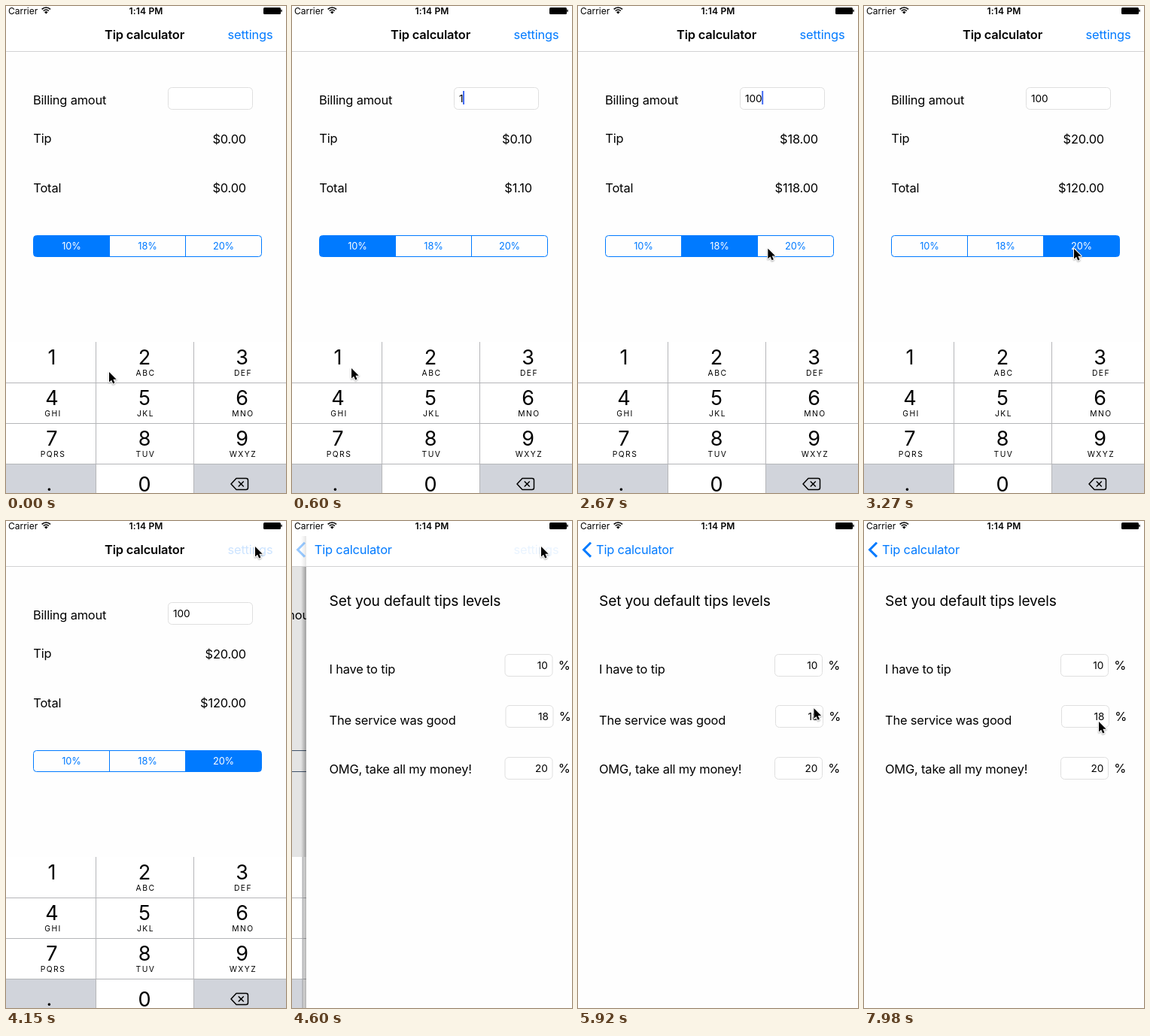
Write an HTML page with a canvas that moves like this. It is 372x648 px and loops after 8 s.

```html
<!DOCTYPE html>
<html lang="en">
<head>
<meta charset="utf-8">
<title>Tip calculator</title>
<style>
html, body { margin: 0; width: 100%; height: 100%; overflow: hidden; background: #fefefe; }
canvas { display: block; width: 372px; height: 648px; }
</style>
</head>
<body>
<canvas id="stage"></canvas>
<script>
const W = 372, H = 648, LOOP = 8000;
const STEP = 147.7;
const BLUE = '#007aff', PAGE = '#fefefe', INK = '#000', KEY_GRAY = '#d1d4db', RULE = '#b5b6b9';
const KEYS_TOP = 447, BODY = 16.4;

const canvas = document.getElementById('stage');
const ctx = canvas.getContext('2d');
const dpr = window.devicePixelRatio || 1;
canvas.width = W * dpr;
canvas.height = H * dpr;

// Pointer moves; from and to are counted in refresh steps
const moves = [
  { from: 0, to: 2, x: 79, y: 482 },    // key 1
  { from: 4, to: 7, x: 183, y: 629 },   // key 0
  { from: 11, to: 13, x: 172, y: 411 },
  { from: 13, to: 15, x: 188, y: 322 }, // 18%
  { from: 17, to: 19, x: 279, y: 323 }, // 20%
  { from: 22, to: 28, x: 331, y: 34 },  // settings
  { from: 34, to: 42, x: 312, y: 267 },
  { from: 46, to: 47, x: 314, y: 260 },
  { from: 47, to: 49, x: 313, y: 267 },
  { from: 50, to: 52, x: 312, y: 243 },
  { from: 52, to: 54, x: 312, y: 267 }
];

function pointerAt(step) {
  let x = 137, y = 487;
  for (const m of moves) {
    const p = Math.min(1, Math.max(0, (step - m.from) / (m.to - m.from)));
    const ease = Math.sin(p * Math.PI / 2);
    x += (m.x - x) * ease;
    y += (m.y - y) * ease;
  }
  return [x, y];
}

function text(str, x, y, { size = BODY, color = INK, align = 'left', weight = 400, space = -0.01 * size } = {}) {
  ctx.font = `${weight} ${size}px Inter, "Open Sans", sans-serif`;
  ctx.letterSpacing = space + 'px';
  ctx.textAlign = align;
  ctx.fillStyle = color;
  ctx.fillText(str, x, y);
}

function rect(x, y, w, h, color) {
  ctx.fillStyle = color;
  ctx.fillRect(x, y, w, h);
}

function roundBox(x, y, w, h, r) {
  ctx.beginPath();
  ctx.roundRect(x, y, w, h, r);
}

function stroke(color, width) {
  ctx.strokeStyle = color;
  ctx.lineWidth = width;
  ctx.stroke();
}

function line(points, color, width) {
  ctx.beginPath();
  points.forEach(([x, y]) => ctx.lineTo(x, y));
  stroke(color, width);
}

function field(x, y, w) {
  roundBox(x + 0.5, y + 0.5, w - 1, 29, 5);
  ctx.fillStyle = '#fff';
  ctx.fill();
  stroke('#dfdfdf', 1);
}

function group(draw, alpha = 1, dx = 0) {
  ctx.save();
  ctx.globalAlpha = alpha;
  ctx.translate(dx, 0);
  draw();
  ctx.restore();
}

function statusBar() {
  text('Carrier', 3, 10.5, { size: 12, space: 0 });
  text('1:14 PM', 186, 10.5, { size: 12, weight: 600, align: 'center', space: 0.2 });
  for (const r of [8, 5]) {
    ctx.beginPath();
    ctx.arc(53.3, 10, r, -Math.PI * 0.75, -Math.PI * 0.25);
    stroke(INK, 1.6);
  }
  ctx.fillStyle = INK;
  ctx.beginPath();
  ctx.moveTo(53.3, 10.5);
  ctx.arc(53.3, 10.5, 3.2, -Math.PI * 0.75, -Math.PI * 0.25);
  ctx.fill();
  roundBox(342, 2, 23, 9, 1.5);
  ctx.fill();
  rect(365.3, 4.8, 1.4, 3, INK);
}

function segments(selected, pressed, tint) {
  const left = 36.5, top = 305.5, w = 101, h = 28;
  ctx.save();
  roundBox(left, top, 3 * w, h, 4);
  ctx.clip();
  rect(left + selected * w, top, w, h, tint);
  if (pressed >= 0) rect(left + pressed * w, top, w, h, 'rgba(0,122,255,.2)');
  ctx.restore();
  roundBox(left, top, 3 * w, h, 4);
  stroke(tint, 1);
  ['10%', '18%', '20%'].forEach((label, i) => {
    const x = left + i * w;
    if (i) line([[x, top], [x, top + h]], tint, 1);
    text(label, x + w / 2, 324.3, {
      size: 12.8, align: 'center', color: i === selected ? '#fff' : tint
    });
  });
}

function keypad(pressed) {
  const centers = [61, 184, 313.5];
  const letters = ['', 'ABC', 'DEF', 'GHI', 'JKL', 'MNO', 'PQRS', 'TUV', 'WXYZ'];
  const digit = (d, x, y) => text(d, x, y, { size: 27, align: 'center', space: 0 });
  rect(0, KEYS_TOP, W, H - KEYS_TOP, '#fff');
  rect(0, 610, 119, 38, KEY_GRAY);
  rect(250, 610, W - 250, 38, KEY_GRAY);
  if (pressed === '1') rect(0, KEYS_TOP, 119, 54, KEY_GRAY);
  if (pressed === '0') rect(120, 610, 129, 38, KEY_GRAY);
  for (const y of [501, 555, 609]) rect(0, y, W, 1, RULE);
  for (const x of [119, 249]) rect(x, KEYS_TOP, 1, H - KEYS_TOP, RULE);
  letters.forEach((abc, i) => {
    const x = centers[i % 3], y = 476.5 + 54 * Math.floor(i / 3);
    digit(i + 1, x, y);
    text(abc, x + 1.5, y + 15.7, { size: 10.3, align: 'center', space: 1.5 });
  });
  digit('0', 184, 646);
  digit('.', 57.5, 644.5);
  deleteIcon();
}

function deleteIcon() {
  ctx.lineJoin = 'round';
  ctx.beginPath();
  ctx.moveTo(299, 636);
  ctx.lineTo(306, 628.5);
  ctx.arcTo(321.5, 628.5, 321.5, 636, 2.5);
  ctx.arcTo(321.5, 643.5, 306, 643.5, 2.5);
  ctx.lineTo(306, 643.5);
  ctx.closePath();
  stroke(INK, 1.5);
  for (const d of [3.5, -3.5]) line([[308.8, 636 - d], [315.8, 636 + d]], INK, 1.5);
}

// Bill text and the step at which it last changed
function typedAt(step) {
  if (step >= 10) return ['100', 10];
  if (step >= 8) return ['10', 8];
  return step >= 4 ? ['1', 4] : ['', 0];
}

function caretAlpha(step, since) {
  if (!since || step >= 27) return 0;
  const phase = (step - since) * STEP / 1000;
  return Math.min(1, Math.max(0, 0.5 + 1.6 * Math.cos(phase * 2 * Math.PI - 0.9)));
}

function calculator(step, tint) {
  const [bill, since] = typedAt(step);
  const choice = step >= 21 ? 2 : step >= 17 ? 1 : 0;
  const pressed = step === 20 ? 2 : step === 16 ? 1 : -1;
  const tip = bill * [0.1, 0.18, 0.2][choice];
  const money = (n, y) => text('$' + n.toFixed(2), 319, y, { align: 'right' });
  text('Billing amout', 36, 131.3);
  text('Tip', 36.3, 181.7);
  text('Total', 36.3, 247.5);
  money(tip, 182.5);
  money(Number(bill) + tip, 247.5);
  field(215, 108, 113);
  text(bill, 222, 127.8, { size: 13.6, space: 0 });
  const caretX = 221.5 + ctx.measureText(bill).width;
  group(() => rect(caretX, 113, 2, 18, '#426bf2'), caretAlpha(step, since));
  segments(choice, pressed, tint);
}

function settings() {
  text('Set you default tips levels', 28, 112.5, { size: 19.2, space: -0.17 });
  const rows = [
    ['I have to tip', 10, 202.7],
    ['The service was good', 18, 270.5],
    ['OMG, take all my money!', 20, 335.5]
  ];
  rows.forEach(([label, level, baseline], i) => {
    const x = 261 + i % 2, y = Math.floor(177 + 68.5 * i);
    text(label, 28, baseline);
    field(x, y, 64);
    text(level, x + 57.4, y + 19.6, { size: 13.6, align: 'right', space: 0 });
    text('%', x + 71.2, y + 21);
  });
}

function backButton(chevronAlpha, shift) {
  ctx.lineJoin = 'miter';
  group(() => line([[17, 28.8], [7.6, 38.2], [17, 47.6]], BLUE, 3), chevronAlpha);
  text('Tip calculator', 24 + shift, 44, { color: BLUE });
}

function navBar() {
  rect(0, 0, W, 60, '#fff');
  rect(0, 60, W, 1, '#d2d2d3');
}

const settingsLink = alpha =>
  group(() => text('settings', 294.5, 44, { color: BLUE }), alpha);

function edgeShadow(x, top, bottom, strength) {
  const shade = ctx.createLinearGradient(x - 7, 0, x, 0);
  shade.addColorStop(0, 'rgba(0,0,0,0)');
  shade.addColorStop(1, `rgba(0,0,0,${strength})`);
  rect(x - 7, top, 7, bottom - top, shade);
}

// The old screen trails at 30% of the speed of the sheet covering it
function pushedScreen(step, offset) {
  const edge = offset * 0.88, trail = -0.3 * (W - offset);
  if (offset) {
    group(() => calculator(step, '#465a74'), 1, trail);
    rect(0, 0, W, H, 'rgba(0,0,0,.1)');
    group(keypad, 1, trail);
    edgeShadow(edge, 60, H, 0.32);
    rect(edge, 0, W - edge, H, PAGE);
  }
  group(settings, 1, offset);
  navBar();
  if (offset) edgeShadow(edge, 20, 60, 0.1);
  backButton(Math.max(0, 1 - offset / 36), offset * 0.27);
  settingsLink(offset * 0.004);
}

function pointer(x, y) {
  ctx.save();
  ctx.translate(x, y);
  const arrow = new Path2D('M0 0V13.6L3.1 10.7L5.2 15.6L7.5 14.6L5.4 9.8H9.7Z');
  ctx.lineJoin = 'round';
  ctx.shadowColor = 'rgba(0,0,0,.35)';
  ctx.shadowBlur = 2 * dpr;
  ctx.shadowOffsetY = dpr;
  ctx.strokeStyle = '#fff';
  ctx.lineWidth = 2;
  ctx.stroke(arrow);
  ctx.shadowColor = 'transparent';
  ctx.fillStyle = INK;
  ctx.fill(arrow);
  ctx.restore();
}

function draw(step) {
  const pushStart = 31;
  ctx.setTransform(dpr, 0, 0, dpr, 0, 0);
  rect(0, 0, W, H, PAGE);
  if (step < pushStart) {
    calculator(step, BLUE);
    keypad(step === 3 ? '1' : step === 7 || step === 9 ? '0' : '');
    navBar();
    text('Tip calculator', 184, 44, { weight: 600, align: 'center' });
    settingsLink(step >= 28 ? 0.2 : 1);
  } else {
    const left = Math.max(0, 1 - (step - pushStart) / 2);
    pushedScreen(step, 21.5 * left ** 2.4);
  }
  statusBar();
  pointer(...pointerAt(step));
}

const start = performance.now();
function tick() {
  const t = (performance.now() - start) % LOOP;
  draw(Math.floor(t / STEP));
  requestAnimationFrame(tick);
}
tick();
</script>
</body>
</html>
```
